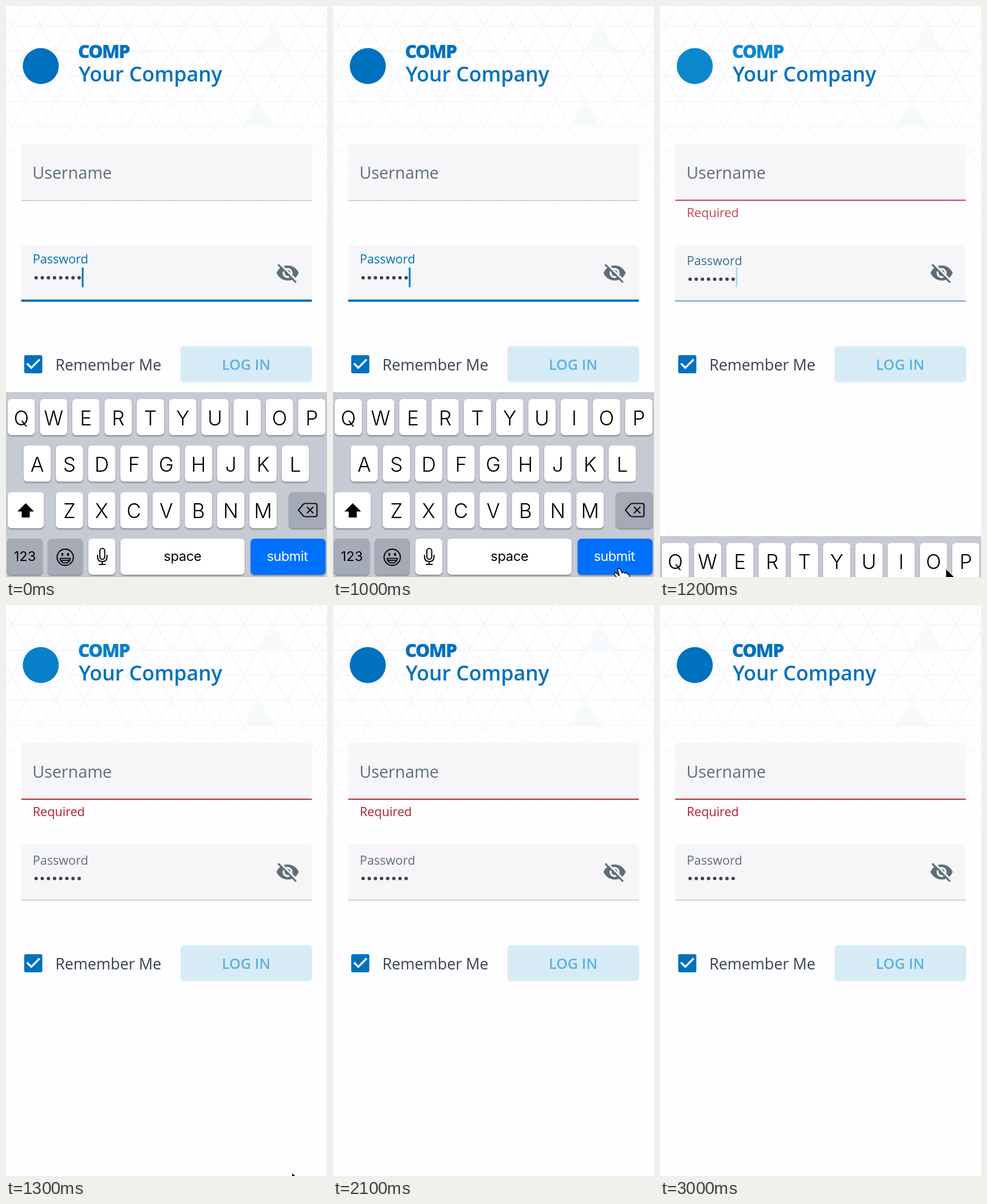
An HTML page that plays this animation: 561x998 px, repeating every 3.1 s.

```html
<!DOCTYPE html>
<html lang="en">
<head>
<meta charset="utf-8">
<title>Login form</title>
<style>
  html, body { margin: 0; width: 100%; height: 100%; overflow: hidden; background: #fefdff; }
  svg { display: block; width: 561px; height: 998px; font-family: "Open Sans", sans-serif; }
  #keyboard { font-family: Inter, sans-serif; text-anchor: middle; }
  #caps { filter: drop-shadow(0 2px 1.3px rgba(50, 55, 66, .45)); }
</style>
</head>
<body>
<svg viewBox="0 0 561 998">
  <defs>
    <linearGradient id="fade" x1="0" y1="0" x2="0" y2="1">
      <stop offset="0" stop-color="#fefdff" stop-opacity="0"/>
      <stop offset="1" stop-color="#fefdff"/>
    </linearGradient>
    <linearGradient id="tint" x1="0" y1="0" x2="0" y2="1">
      <stop offset="0" stop-color="#f5f9fa"/>
      <stop offset="1" stop-color="#f0f8f9"/>
    </linearGradient>
  </defs>
  <rect width="561" height="998" fill="#fefdff"/>
  <path id="mesh" fill="none" stroke="#f5f6f8" stroke-width="2"/>
  <path d="M466 34L491 79H441z" fill="url(#tint)" opacity=".6"/>
  <path d="M440 166L465.500 211H414.500z" fill="url(#tint)"/>
  <rect y="130" width="561" height="290" fill="url(#fade)"/>

  <circle id="logo" cx="60.800" cy="105" r="31.500"/>
  <text id="brand" x="125.800" y="91" font-size="32" font-weight="800" letter-spacing="-1.800">COMP</text>
  <text x="127" y="132" font-size="35.600" font-weight="600" fill="#0071bc">Your Company</text>

  <g fill="#f6f6f8">
    <path d="M26.500 340V247q0-6 6-6H528.500q6 0 6 6V340z"/>
    <path d="M26.500 516V424q0-6 6-6H528.500q6 0 6 6V516z"/>
  </g>
  <text x="46.200" y="301.500" font-size="28.700" fill="#5f6e76">Username</text>
  <rect id="userLine" x="26.500" width="508"/>
  <text id="error" x="46.800" y="369" font-size="21.550" fill="#b71c2b">Required</text>

  <text id="label" x="46.800" font-size="21.550">Password</text>
  <g id="dots" fill="#39444b"></g>
  <rect id="caret" x="132.500" y="457" width="3" height="34.500" fill="#0072bf"/>
  <rect id="passLine" x="26.500" width="508"/>
  <g transform="translate(471 445.500) scale(1.760)" fill="#5f6e76">
    <path d="M1 12C2.700 7.600 7 4.500 12 4.500S21.300 7.600 23 12C21.300 16.400 17 19.500 12 19.500S2.700 16.400 1 12z"/>
    <circle cx="12" cy="12" r="5" fill="#f6f6f8"/>
    <circle cx="12" cy="12" r="3"/>
    <path d="M4 2.450L22 20.450" stroke="#f6f6f8" stroke-width="1.800"/>
    <path d="M2.630 3.630L20.370 21.370" stroke="#5f6e76" stroke-width="1.800"/>
  </g>

  <rect x="31.800" y="610.200" width="31.700" height="31.700" rx="3" fill="#0071bf"/>
  <path d="M36.600 624.800L44.200 632.400L58.800 617.800" fill="none" stroke="#fff" stroke-width="3.400"/>
  <text x="86.200" y="637" font-size="26.850" fill="#37434a">Remember Me</text>
  <rect x="305" y="594.500" width="230" height="63" rx="6" fill="#d7ebf7"/>
  <text x="419.700" y="636" font-size="25.100" font-weight="600" fill="#5db1df" text-anchor="middle">LOG IN</text>

  <g id="keyboard">
    <rect y="675" width="561" height="324" fill="#c6cad2"/>
    <g id="caps"></g>
    <g id="letters" font-size="35" font-weight="350"></g>
    <g font-size="23.500">
      <text x="33" y="970">123</text>
      <text x="308.500" y="970" letter-spacing="-.300">space</text>
      <text x="491.500" y="970" letter-spacing="-.500" fill="#fff">submit</text>
    </g>
    <path d="M34.500 869L49 883.500H41.500V894H27.500V883.500H20z"/>
    <g fill="none" stroke="#111" stroke-width="2.200" stroke-linecap="round" stroke-linejoin="round">
      <path d="M511 881L519.500 871Q521 869.500 523 869.500H540.500Q543.500 869.500 543.500 872.500V889.500Q543.500 892.500 540.500 892.500H523Q521 892.500 519.500 891zM526.500 876L536.500 886M536.500 876L526.500 886"/>
      <circle cx="103.500" cy="963.500" r="14.200"/>
      <path d="M94.500 965.500H112.500Q111 973.500 103.500 973.500T94.500 965.500zM96 969H111"/>
      <rect x="164" y="948" width="8.500" height="19" rx="4.250"/>
      <path d="M160 960V963Q160 971 168.200 971T176.500 963V960M168.200 971V976M163 976H173.500"/>
    </g>
    <ellipse cx="98.500" cy="958.500" rx="1.900" ry="2.700"/>
    <ellipse cx="108.500" cy="958.500" rx="1.900" ry="2.700"/>
  </g>

  <g stroke-linejoin="round">
    <path id="hand" d="M500 994L497.500 986Q497 983 499.500 983T503 986L505 991Q508 988.500 510 991.500Q513 989.500 514.500 993Q517 992 518 996V1004H500L492 994Q490.500 991 493.500 990.500Q496 991 500 996z" fill="#fff" stroke="#111" stroke-width="1.500"/>
    <path id="arrow" d="M0 0V25L6 19.500L10 29L14.500 27L10.500 18H18z" fill="#000" stroke="#fff" stroke-width="1.200"/>
  </g>
</svg>
<script>
const LOOP = 3100, STEP = 100;
const SIDE = 50.7, ROW = 43.9;
const $ = id => document.getElementById(id);

function add(parent, tag, attrs, text = "") {
  const el = document.createElementNS("http://www.w3.org/2000/svg", tag);
  set(el, attrs);
  el.textContent = text;
  $(parent).append(el);
}
function set(el, attrs) {
  for (const k in attrs) el.setAttribute(k, attrs[k]);
}

// Triangular mesh behind the header.
let mesh = "";
for (let j = -1; j < 9; j++) mesh += `M0 ${35 + j * ROW}H561`;
for (let i = -10; i < 22; i++) {
  const x = 466 - 9 * SIDE + i * SIDE, drop = 8 * ROW, run = 4 * SIDE;
  for (const s of [-1, 1])
    mesh += `M${x - s * SIDE / 2} ${35 - ROW}L${x + s * run} ${35 + drop}`;
}
set($("mesh"), { d: mesh });

for (let i = 0; i < 8; i++) add("dots", "circle", { cx: 52.6 + i * 10.75, cy: 0, r: 3 });

function cap(x, y, w, fill = "#fff") {
  add("caps", "rect", { x, y, width: w, height: 63, rx: 6.5, fill });
}
[["QWERTYUIOP", 3, 687], ["ASDFGHJKL", 30.7, 768.3], ["ZXCVBNM", 87, 849.7]].forEach(([row, x0, y]) => {
  [...row].forEach((ch, i) => {
    const x = x0 + i * 56.4;
    cap(x, y, 47.6);
    add("letters", "text", { x: x + 23.8, y: y + 45.5 }, ch);
  });
});
const GREY = "#a4aab6";
cap(3, 849.7, 63);
cap(494.5, 849.7, 64, GREY);
cap(2, 931, 62, GREY);
cap(73, 931, 61, GREY);
cap(144, 931, 47);
cap(200, 931, 217);
cap(427.5, 931, 131, "#0070ff");

const mix = (a, b, k) => a + (b - a) * k;

// Piecewise linear value from [time, value] stops.
function at(t, stops) {
  if (t <= stops[0][0]) return stops[0][1];
  for (let i = 1; i < stops.length; i++) {
    const [t0, a] = stops[i - 1], [t1, b] = stops[i];
    if (t <= t1) return mix(a, b, (t - t0) / (t1 - t0));
  }
  return stops[stops.length - 1][1];
}
function blend(a, b, k) {
  return `rgb(${a.map((v, i) => Math.round(mix(v, b[i], k)))})`;
}
const BLUE = [0, 113, 191], SKY = [17, 145, 213], SLATE = [95, 110, 118];
const LINE = [194, 197, 202], RED = [183, 28, 43];

function draw(t) {
  const off = at(t, [[1000, 0], [1100, 123.5], [1200, 251.5], [1300, 330]]);
  const err = at(t, [[1000, 0], [1100, .42], [1200, .8], [1300, 1]]);
  const blur = at(t, [[1000, 0], [1100, .25], [1200, .66], [1300, 1]]);
  const flash = at(t, [[1000, 0], [1100, 1], [1200, .68], [1500, 0]]);
  const tone = blend(BLUE, SKY, flash);

  set($("keyboard"), { transform: `translate(0 ${off})` });
  set($("logo"), { fill: tone });
  set($("brand"), { fill: tone });
  set($("error"), { opacity: err });

  const userH = mix(1.5, 2, err);
  set($("userLine"), { y: 340.5 - userH, height: userH, fill: err ? blend([226, 150, 158], RED, err) : "#c2c5ca" });

  const passH = mix(4, 1.5, blur);
  set($("passLine"), { y: mix(517, 516.5, blur) - passH, height: passH, fill: blend(BLUE, LINE, blur) });
  set($("label"), { y: mix(450, 454, Math.sqrt(blur)), fill: blend(BLUE, SLATE, blur) });
  set($("dots"), { transform: `translate(0 ${mix(475, 478, Math.sqrt(blur))})` });
  set($("caret"), { opacity: at(t, [[1000, 1], [1100, .78], [1200, .26], [1300, 0]]) });

  const handY = at(t, [[800, 16], [1000, 0]]);
  set($("hand"), { transform: `translate(0 ${handY})`, opacity: t > 800 && t < 1100 ? 1 : 0 });
  const arrowY = at(t, [[1100, 979.5], [1200, 983], [1400, 1000]]);
  set($("arrow"), { transform: `translate(499.500 ${arrowY})`, opacity: t >= 1100 && t < 1400 ? 1 : 0 });
}

const start = performance.now();
function tick() {
  const t = (performance.now() - start) % LOOP;
  draw(Math.floor(t / STEP) * STEP);
  requestAnimationFrame(tick);
}
tick();
</script>
</body>
</html>
```
